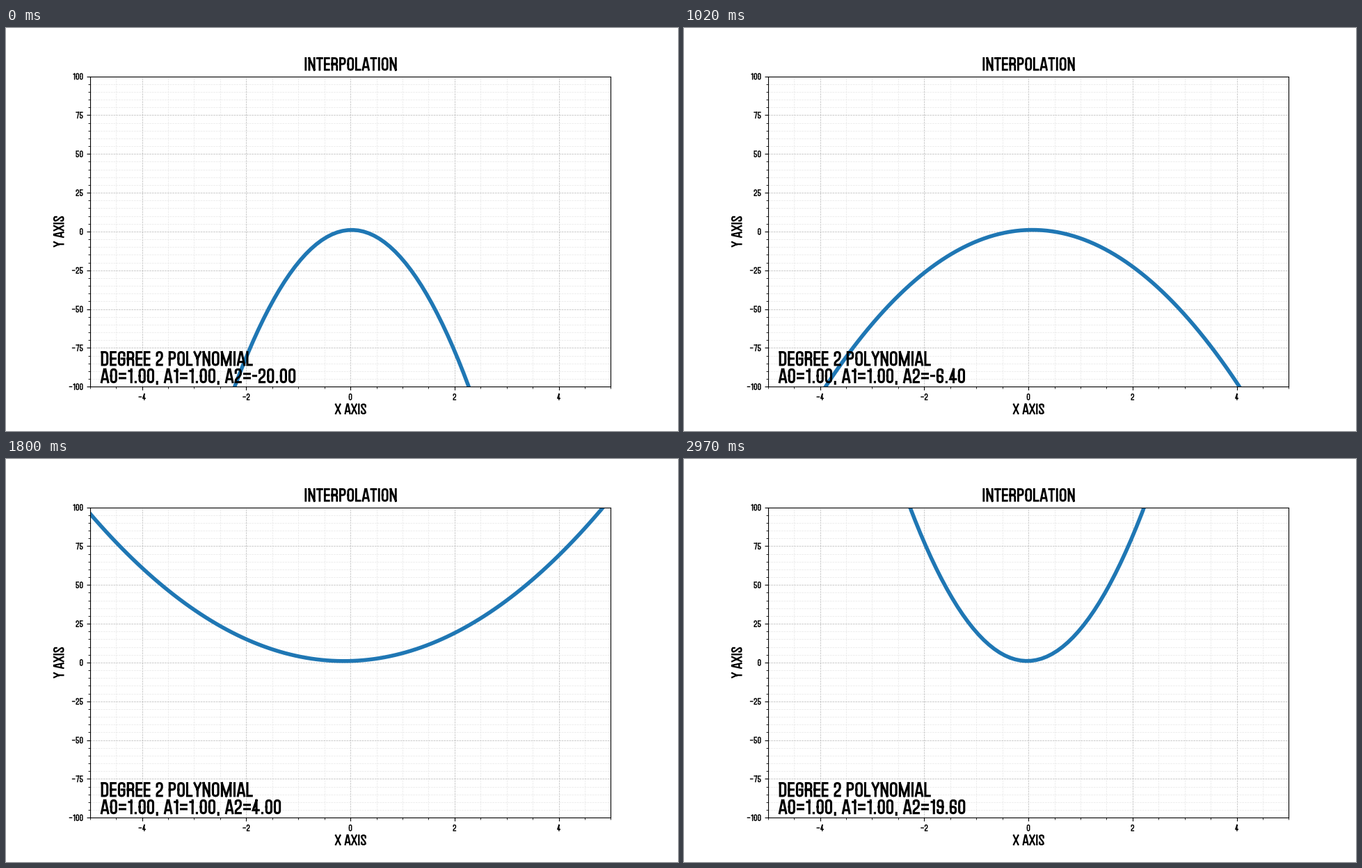
A matplotlib script for the animation above (3000 ms loop, 966 by 580 pixels).

```python
import matplotlib.pyplot as plt
import numpy as np
from matplotlib.animation import FuncAnimation
from matplotlib.patches import PathPatch
from matplotlib.path import Path
from matplotlib.ticker import AutoMinorLocator
from matplotlib.transforms import Affine2D

W, H, DPI = 966, 580, 100
FRAMES, INTERVAL = 100, 30

# Condensed stroke lettering, in thousandths of an em.
STEM, CAP, RADIUS = 102, 700, 125
ROWS = dict(t=CAP - STEM / 2, v=575, u=490, e=440, m=345, f=240, d=190,
            o=58, b=STEM / 2, y=-25)

# Advance, side bearing, strokes. Each point is column + row; capitals round the corner.
GLYPHS = {
    " ": (200, 0, ""),
    "A": (430, 10, "lb pt|rb qt|pd qd"),
    "D": (420, 36, "lt RT RB lb lt"),
    "E": (375, 30, "rt lt lb rb|lm rm"),
    "G": (420, 34, "ru RT LT LB RB rm cm"),
    "I": (190, 42, "ct cb"),
    "L": (365, 28, "lt lb rb"),
    "M": (585, 38, "lb lt|rb rt|lt cb|cb rt"),
    "N": (440, 38, "lb lt|lt rb|rb rt"),
    "O": (420, 34, "lm LT RT RB LB lm"),
    "P": (405, 30, "lb lt RT RM lm"),
    "R": (420, 36, "lb lt RT RM lm|lm RM rb"),
    "S": (405, 26, "ru RT LT LU RD RB LB ld"),
    "T": (375, 10, "lt rt|ct cb"),
    "X": (420, 12, "lt rb|lb rt"),
    "Y": (400, 8, "lt cm|rt cm|cm cb"),
    "0": (400, 32, "lm LT RT RB LB lm"),
    "1": (300, 46, "rb rt|lv rv"),
    "2": (400, 32, "lu LT RT RM LD lb rb"),
    "3": (400, 32, "lu LT RT RM cm|cm RM RB LB ld"),
    "4": (400, 16, "qb qt|qt ld rd"),
    "5": (400, 32, "rt lt lm RM RB LB ld"),
    "6": (400, 32, "ru RT LT LB RB RM lm"),
    "7": (400, 26, "lt rt|rt cb"),
    "8": (400, 32, "lm LT RT RB LB lm|lm rm"),
    "9": (400, 32, "ld LB RB RT LT LM rm"),
    "=": (430, 36, "le re|lf rf"),
    "-": (290, 28, "lm rm"),
    "\u2212": (400, 34, "lm rm"),
    ".": (210, 0, "cb co"),
    ",": (210, 0, "co cy"),
}


def stroke(tokens, cols):
    pts = np.array([(cols[t[0].lower()], ROWS[t[1].lower()]) for t in tokens])
    verts, codes = [pts[0]], [Path.MOVETO]
    for i in range(1, len(pts)):
        if tokens[i].isupper():
            a, b = (pts[i] + d * min(RADIUS / np.hypot(*d), 0.5)
                    for d in (pts[i - 1] - pts[i], pts[i + 1] - pts[i]))
            verts += [a, pts[i], b]
            codes += [Path.LINETO, Path.CURVE3, Path.CURVE3]
        else:
            verts.append(pts[i])
            codes.append(Path.LINETO)
    return verts, codes


def lettering(text):
    """Return the path of a line of text and its advance."""
    verts, codes, x = [], [], 0
    for ch in text:
        adv, side, spec = GLYPHS[ch]
        mid = x + adv / 2
        cols = dict(l=x + side + STEM / 2, r=x + adv - side - STEM / 2,
                    c=mid, p=mid - 28, q=mid + 28)
        for part in filter(None, spec.split("|")):
            v, c = stroke(part.split(), cols)
            verts += v
            codes += c
        x += adv
    return Path(verts, codes), x


def place(text, size, x, y, align=0.0, angle=0):
    """Draw text with its baseline at pixel (x, y), measured from the top left."""
    path, adv = lettering(text)
    scale = size * DPI / 72 / 1000
    trans = (Affine2D().translate(-align * adv, 0).scale(scale)
             .rotate_deg(angle).translate(x, H - y).scale(1 / DPI))
    patch = PathPatch(path, fill=False, ec="black", lw=size * STEM / 1000,
                      capstyle="projecting", joinstyle="miter", snap=False,
                      transform=trans + fig.dpi_scale_trans, zorder=5)
    fig.add_artist(patch)
    return patch


fig = plt.figure(figsize=(W / DPI, H / DPI), dpi=DPI, facecolor="white")
ax = fig.add_axes([0.125, 0.11, 0.775, 0.77])
ax.set(xlim=(-5, 5), ylim=(-100, 100),
       xticks=range(-4, 5, 2), yticks=range(-100, 101, 25))
ax.xaxis.set_minor_locator(AutoMinorLocator(4))
ax.yaxis.set_minor_locator(AutoMinorLocator(5))
ax.tick_params(which="both", labelleft=False, labelbottom=False)
ax.set_axisbelow(True)
ax.grid(which="major", ls="--", lw=0.5, color="0.7")
ax.grid(which="minor", ls="--", lw=0.5, color="0.9")

left, right = 0.125 * W, 0.9 * W
top, bottom = 0.12 * H, 0.89 * H
center = (left + right) / 2

for v in range(-4, 5, 2):
    x = left + (v + 5) / 10 * (right - left)
    place(str(v).replace("-", "\u2212"), 10, x, 535.7, 0.5)
for v in range(-100, 101, 25):
    y = bottom - (v + 100) / 200 * (bottom - top)
    place(str(v).replace("-", "\u2212"), 10, left - 9.7, y + 4.9, 1)

place("INTERPOLATION", 20, center + 0.4, 61.5, 0.5)
place("X AXIS", 16, center + 0.4, 556, 0.5)
place("Y AXIS", 16, 83.5, (top + bottom) / 2, 0.5, 90)
place("DEGREE 2 POLYNOMIAL", 22, 135.5, 486.4)
coeffs = place("A0=1.00", 22, 135.5, 511.2)

xs = np.linspace(-5, 5, 100)
curve, = ax.plot(xs, xs, lw=4, color="#1f77b4")


def update(i):
    a0, a1, a2 = 1, 1, 0.4 * (i - 50)
    curve.set_ydata(a0 + a1 * xs + a2 * xs**2)
    coeffs.set_path(lettering(f"A0={a0:.2f}, A1={a1:.2f}, A2={a2:.2f}")[0])
    return curve, coeffs


anim = FuncAnimation(fig, update, frames=FRAMES, interval=INTERVAL,
                     init_func=lambda: update(0), repeat=True, repeat_delay=0)
plt.show()
```
